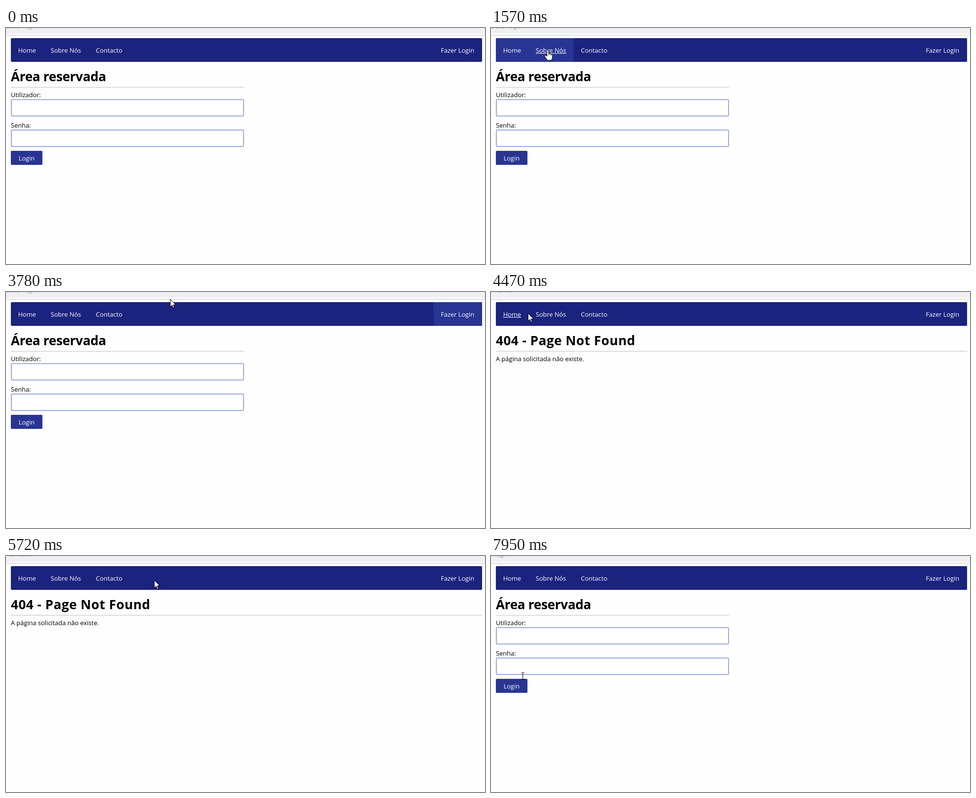
These frames come from a looping animation (986x488 px, 8 s). An HTML page:

```html
<!DOCTYPE html>
<html lang="pt">
<head>
<meta charset="utf-8">
<style>
  html, body { margin: 0; width: 100%; height: 100%; overflow: hidden; background: #fefefe; }
  svg { display: block; width: 986px; height: 488px; font: 13px "Open Sans", "Noto Sans", sans-serif; }
  .title { font-size: 26.5px; font-weight: 700; }
  .field { fill: #fff; stroke: #9fa8da; stroke-width: 2; }
  .white { fill: #fff; }
  #cursor path { fill: #fff; stroke: #000; stroke-linejoin: round; }
  #cursor #beam { fill: none; }
</style>
</head>
<body>
<svg viewBox="0 0 986 488">
  <rect width="986" height="11" fill="#f0eff4"/>
  <rect y="11" width="986" height="4" fill="#fafafc"/>
  <rect y="15" width="986" height="1" fill="#cbcbcf"/>
  <text id="query" x="0" y="1" fill="#d4806f">oute=</text>
  <text id="route" y="1"></text>

  <rect x="10" y="21" width="970" height="49" rx="2" fill="#1a237e"/>
  <g id="nav" class="white"></g>

  <g id="form">
    <text class="title" x="10" y="110" letter-spacing="-.3">Área reservada</text>
    <rect x="10" y="122" width="480" height="1" fill="#c0c0c0"/>
    <text x="10" y="143">Utilizador:</text>
    <rect class="field" x="11" y="148" width="478" height="34" rx="2"/>
    <text x="10" y="206">Senha:</text>
    <rect class="field" x="11" y="211" width="478" height="34" rx="2"/>
    <rect x="10" y="254" width="65" height="29" rx="2" fill="#283593"/>
    <text class="white" x="26" y="274">Login</text>
  </g>
  <g id="missing">
    <text class="title" x="10" y="110" letter-spacing=".52">404 - Page Not Found</text>
    <rect x="10" y="122" width="970" height="1" fill="#c0c0c0"/>
    <text x="10" y="143">A página solicitada não existe.</text>
  </g>

  <g id="cursor">
    <path id="arrow" d="M.5 .5V16.5L4.2 13 6.6 18.6 8.9 17.6 6.5 12.2H11.5Z"/>
    <path id="hand" d="M-1.8 13V2.3A1.8 1.8 0 0 1 1.8 2.3V7.5Q3.8 6.3 4.6 8.2 6.5 7.2 7.3 9.2 9.6 8.7 9.6 11V15Q9.6 18 7.2 21.8H-1Q-2.5 18.5-5.6 15-7.6 12.6-6 11.6-4.6 10.8-1.8 13.6M1.8 7.5V11M4.6 8.2V11.5M7.3 9.2V12"/>
    <path id="beam" d="M-3-7.5H-1L0-6.5 1-7.5H3M0-6.5V6.5M-3 7.5H-1L0 6.5 1 7.5H3"/>
  </g>
</svg>
<script>
const LOOP = 8000;
const $ = id => document.getElementById(id);
const clamp = v => Math.max(0, Math.min(1, v));
const show = (el, on) => el.style.display = on ? '' : 'none';

// label, item left, item width, text width
const items = [
  ['Home', 10, 67, 37], ['Sobre Nós', 77, 93, 63],
  ['Contacto', 170, 86, 56], ['Fazer Login', 880, 100, 70]
];
$('nav').innerHTML = items.map(([label, x, w, tw]) =>
  `<rect x="${x}" y="21" width="${w}" height="49" rx="1" fill="#283593"/>
   <text x="${x + 15}" y="51">${label}</text>
   <rect x="${x + 15}" y="52" width="${tw}" height="1"/>`).join('');
const navItems = items.map((_, i) => [...$('nav').children].slice(i * 3, i * 3 + 3));

// item, hover start, hover end, highlight strength
const hovers = [
  [0, 840, 1350, 1], [1, 1350, 1950, 1], [2, 1950, 2700, .4], [3, 2930, 3500, 1],
  [0, 4050, 4520, 0], [1, 4540, 5090, 0], [2, 5090, 5680, 0], [3, 5920, 7100, 0]
];

const routes = [
  [0, 'login'], [4300, 'home'], [4800, 'about'], [5400, 'contact'], [6270, 'login']
];

// time, x, y, shape used from then on
const path = [
  [70, 890, 480, 'arrow'], [470, 520, 260, 'arrow'], [760, 130, 62, 'hand'],
  [870, 45, 47, 'hand'], [1250, 48, 46, 'hand'], [1500, 116, 45, 'hand'],
  [1570, 117, 45, 'hand'], [1780, 122, 45, 'hand'], [2050, 212, 46, 'hand'],
  [2600, 215, 46, 'hand'], [2700, 256, 44, 'arrow'], [2790, 835, 42, 'arrow'],
  [2860, 859.5, 38, 'arrow'], [2930, 890, 44, 'hand'], [3050, 925, 46, 'hand'],
  [3430, 930, 47, 'hand'], [3500, 880, 46, 'arrow'], [3560, 835, 43, 'arrow'],
  [3800, 295, 12, 'arrow'], [3950, 105, 11, 'arrow'], [4050, 55, 40, 'hand'],
  [4130, 45, 46, 'hand'], [4380, 46, 46, 'arrow'], [4470, 75.5, 43.5, 'arrow'],
  [4540, 100, 45, 'hand'], [4620, 118, 46, 'hand'], [5020, 124, 46, 'hand'],
  [5200, 210, 48, 'hand'], [5600, 216, 48, 'hand'], [5680, 256, 49, 'arrow'],
  [5720, 300.5, 49.5, 'arrow'], [5860, 901, 55, 'arrow'], [5920, 920, 54, 'hand'],
  [6000, 944.5, 53, 'hand'], [7050, 944.5, 53, 'hand'], [7110, 890, 71, 'arrow'],
  [7450, 470, 215, 'beam'], [7600, 260, 247, 'arrow'], [7720, 130, 244, 'beam'],
  [7810, 97.5, 212, 'beam'], [7880, 82, 232, 'beam'], [7950, 65.5, 248.5, 'beam'],
  [8000, 65.5, 248.5, 'beam']
];

function drawNav(t) {
  navItems.forEach(([back, , line], i) => {
    const own = hovers.filter(h => h[0] === i);
    const lit = own.map(([, on, off, level]) =>
      level * clamp((t - on) / 200) * clamp((off + 700 - t) / 300));
    back.setAttribute('opacity', Math.max(...lit));
    show(line, own.some(([, on, off]) => t >= on && t < off));
  });
}

function drawPage(t) {
  const at = routes.findLastIndex(r => t >= r[0]);
  const name = routes[at][1];
  const route = $('route');
  route.textContent = name;
  route.setAttribute('x', at ? 7 : 35);
  route.setAttribute('fill', at ? '#929297' : '#b5a1a3');
  show($('query'), at === 0);
  show($('form'), name === 'login');
  show($('missing'), name !== 'login');
}

function drawCursor(t) {
  const i = path.findLastIndex(k => t >= k[0]);
  show($('cursor'), i >= 0);
  if (i < 0) return;
  const a = path[i], b = path[i + 1] || a;
  const f = clamp((t - a[0]) / (b[0] - a[0] || 1));
  const x = a[1] + (b[1] - a[1]) * f, y = a[2] + (b[2] - a[2]) * f;
  $('cursor').setAttribute('transform', `translate(${x} ${y})`);
  for (const id of ['arrow', 'hand', 'beam']) show($(id), id === a[3]);
}

const start = performance.now();
function frame() {
  const t = (performance.now() - start) % LOOP;
  drawNav(t);
  drawPage(t);
  drawCursor(t);
  requestAnimationFrame(frame);
}
frame();
</script>
</body>
</html>
```
